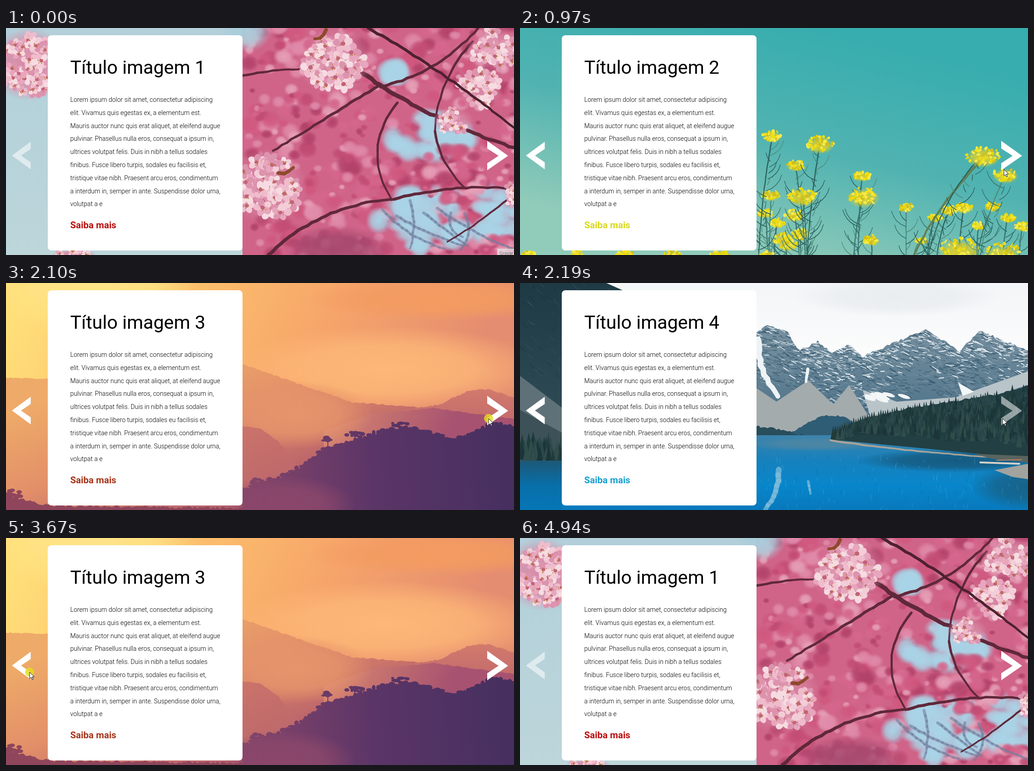
Animation of 1119x501 px, one loop 5.07 s. Source, as an HTML page with a canvas:

```html
<!DOCTYPE html>
<html lang="pt">
<head>
<meta charset="utf-8">
<title>Carrossel</title>
<style>
html, body { margin: 0; width: 100%; height: 100%; overflow: hidden; background: #fff; }
#stage { position: relative; width: 1119px; height: 501px; overflow: hidden; }
section { position: relative; height: 501px; }
canvas, svg { position: absolute; left: 0; top: 0; display: block; }
text { font-family: Roboto, Arial, sans-serif; }
.title { font-size: 41.2px; }
.body { font-size: 14px; font-weight: 300; }
.more { font-size: 20.5px; font-weight: 700; }
#strip, #record, #cursor, #hand, #arrow, #ring { animation: slide 5070ms step-end infinite; }
#record { animation-name: record; }
#cursor { animation-name: move; }
#hand { animation-name: hand; }
#arrow { animation-name: arrow; }
#ring { animation-name: ring; }

@keyframes slide {
  0%, 83.03% { transform: translateY(0); }
  19.13%, 73.76% { transform: translateY(-501px); }
  34.91%, 64.49% { transform: translateY(-1002px); }
  43.19% { transform: translateY(-1503px); }
}
@keyframes record { 0% { opacity: 1; } 1.38%, 100% { opacity: 0; } }
@keyframes hand {
  0%, 19.13%, 34.91%, 64.49%, 100% { opacity: 0; }
  14.98%, 26.82%, 57.79% { opacity: 1; }
}
@keyframes arrow {
  0%, 19.13%, 34.91%, 64.49%, 100% { opacity: 1; }
  14.98%, 26.82%, 57.79% { opacity: 0; }
}
@keyframes ring {
  0%, 19.13%, 43.19%, 64.49%, 81.65%, 100% { opacity: 0; }
  17.75%, 41.42%, 63.11%, 72.38% { opacity: .82; }
}
@keyframes move {
  0%, 1.38% { transform: translate(1097px, 530px); animation-timing-function: steps(4, start); }
  6.90%, 12.22% { transform: translate(1031px, 352px); animation-timing-function: steps(4, start); }
  17.75%, 26.82% { transform: translate(1066px, 312px); animation-timing-function: steps(5, start); }
  33.72%, 49.70% { transform: translate(1063px, 299px); animation-timing-function: steps(3, start); }
  53.84%, 56.41% { transform: translate(86px, 249px); animation-timing-function: steps(4, start); }
  61.93%, 86.78% { transform: translate(52px, 296px); animation-timing-function: steps(3, start); }
  90.92%, 94.67% { transform: translate(1068px, 486px); animation-timing-function: steps(3, start); }
  98.81%, 100% { transform: translate(1075px, 502px); }
}
</style>
</head>
<body>
<div id="stage">
  <div id="strip"></div>
  <svg width="1119" height="501">
    <g id="record">
      <rect x="1082" y="487" width="37" height="14" fill="#e4dde0" opacity=".8"/>
      <text x="1087" y="501" font-size="10.5" fill="#777">Gravar</text>
    </g>
    <g id="cursor">
      <circle id="ring" r="10" fill="#e6dc1e"/>
      <path id="arrow" d="M0 0v14.5l3.4-3.2 2.4 5.4 2.2-1-2.4-5.2h4.6z" fill="#fff" stroke="#111"/>
      <path id="hand" d="M-1 0c0-2 3-2 3 0v5l5.5 1.3q2 .6 2 2.7v3.5q0 2-1.4 3.5v2.5h-7v-2.5l-4.500-5.500q-1.200-2 .6-2.400l1.800 1.600z" fill="#fff" stroke="#111"/>
    </g>
  </svg>
</div>
<script>
const W = 1119, H = 501;
const lines = [
  'Lorem ipsum dolor sit amet, consectetur adipiscing',
  'elit. Vivamus quis egestas ex, a elementum est.',
  'Mauris auctor nunc quis erat aliquet, at eleifend augue',
  'pulvinar. Phasellus nulla eros, consequat a ipsum in,',
  'ultrices volutpat felis. Duis in nibh a tellus sodales',
  'finibus. Fusce libero turpis, sodales eu facilisis et,',
  'tristique vitae nibh. Praesent arcu eros, condimentum',
  'a interdum in, semper in ante. Suspendisse dolor urna,',
  'volutpat a e'
];
let g, seed = 7;

const rnd = () => {
  seed = seed + 0x6D2B79F5 | 0;
  let t = Math.imul(seed ^ seed >>> 15, 1 | seed);
  t = t + Math.imul(t ^ t >>> 7, 61 | t) ^ t;
  return ((t ^ t >>> 14) >>> 0) / 4294967296;
};
const span = (a, b) => a + rnd() * (b - a);
const pick = list => list[rnd() * list.length | 0];
const times = (n, fn) => { for (let i = 0; i < n; i++) fn(i); };

// Calls fn at n random places inside an ellipse
const scatter = (n, x, y, rx, ry, fn) => times(n, () => {
  const a = rnd() * 6.28, d = Math.sqrt(rnd());
  fn(x + Math.cos(a) * d * rx, y + Math.sin(a) * d * ry);
});
function ramp(x0, y0, x1, y1, ...colors) {
  const r = g.createLinearGradient(x0, y0, x1, y1);
  colors.forEach((c, i) => r.addColorStop(i / (colors.length - 1), c));
  return r;
}
function rect(x, y, w, h, fill) {
  g.fillStyle = fill;
  g.fillRect(x, y, w, h);
}
function oval(x, y, rx, ry, fill, turn = 0) {
  g.fillStyle = fill;
  g.beginPath();
  g.ellipse(x, y, rx, ry, turn, 0, 7);
  g.fill();
}
function soft(x, y, rx, ry, color) {
  g.save();
  g.translate(x, y);
  g.scale(rx, ry);
  const r = g.createRadialGradient(0, 0, 0, 0, 0, 1);
  r.addColorStop(0, color);
  r.addColorStop(.55, color + 'cc');
  r.addColorStop(1, color + '00');
  rect(-1, -1, 2, 2, r);
  g.restore();
}
function poly(p, fill) {
  g.beginPath();
  for (let i = 0; i < p.length; i += 2) g.lineTo(p[i], p[i + 1]);
  g.closePath();
  g.fillStyle = fill;
  g.fill();
}
function line(x0, y0, x1, y1, width, color) {
  g.strokeStyle = color;
  g.lineWidth = width;
  g.lineCap = 'round';
  g.beginPath();
  g.moveTo(x0, y0);
  g.lineTo(x1, y1);
  g.stroke();
}
// Tapering, slightly knobbly arc; bend pushes its middle sideways
function bough(x0, y0, x1, y1, width, bend, color) {
  const dx = x1 - x0, dy = y1 - y0, len = Math.hypot(dx, dy), n = Math.ceil(len / 12);
  let px = x0, py = y0;
  times(n, i => {
    const k = (i + 1) / n, off = bend * 4 * k * (1 - k) + (k < 1 ? span(-1, 1) * width * .2 : 0);
    const x = x0 + dx * k - dy / len * off, y = y0 + dy * k + dx / len * off;
    line(px, py, x, y, width * (1.1 - k * .3), color);
    px = x;
    py = y;
  });
}
// Rough outline through a few key points
function ridge(p, rough, step = 5) {
  const out = [];
  for (let i = 0; i < p.length - 2; i += 2) {
    const dx = p[i + 2] - p[i], dy = p[i + 3] - p[i + 1], n = Math.ceil(dx / step);
    times(n, k => out.push(p[i] + dx * k / n, p[i + 1] + dy * k / n + span(-rough, rough)));
  }
  return out.concat(p.slice(-2));
}
function land(p, fill, rough, base = H) {
  const r = ridge(p, rough);
  poly([...r, r[r.length - 2], base, r[0], base], fill);
  return r;
}

function flower(x, y, r) {
  const a0 = rnd() * 6;
  times(5, i => {
    const a = a0 + i * 1.257;
    oval(x + Math.cos(a) * r * .56, y + Math.sin(a) * r * .5, r * .5, r * .38,
      pick(['#e7a6bd', '#efbccd', '#f3cdd8', '#dd93ae', '#f6dce2']), a);
  });
  oval(x, y, r * .24, r * .22, '#c4607f');
  scatter(6, x, y, r * .45, r * .4, (u, v) => oval(u, v, 1.2, 1.2, '#b9793f'));
}
function cluster(x, y, rx, ry, n, r) {
  soft(x, y, rx * 1.1, ry * 1.1, '#d988a5');
  scatter(n, x, y, rx * .85, ry * .85, (u, v) => flower(u, v, span(.7, 1.1) * r));
}
function blossom() {
  const blur = (x, y) => {
    const r = span(7, 26);
    soft(x, y, r, r * span(.7, 1), pick(['#d5658c', '#c24c74', '#e08aa9', '#b3426a', '#d0587f', '#e6a0b7']));
  };
  rect(0, 0, W, H, ramp(0, 0, 0, H, '#b2cfda', '#bcd6da'));
  rect(521, 0, W - 521, H, '#cf6488');
  scatter(900, 820, 250, 420, 350, (x, y) => x > 535 && blur(x, y));
  soft(530, 5, 55, 48, '#a9cddb');
  soft(730, 490, 120, 55, '#a84a70');
  const sky = (x, y) => soft(x, y, span(22, 45), span(16, 34), '#a9d3e6');
  scatter(18, 930, 240, 85, 45, sky);
  scatter(40, 980, 425, 160, 75, sky);
  scatter(6, 856, 105, 12, 16, sky);
  scatter(45, 985, 325, 75, 60, blur);
  scatter(25, 1090, 480, 45, 20, blur);
  times(7, i => bough(830 + i * 30, span(375, 430), span(880, W), span(450, H), 6, span(-15, 15), '#6f7f9f99'));
  const bark = '#60283a';
  bough(521, 105, 655, 92, 5, -4, bark);
  bough(820, 128, 588, 271, 6, 0, bark);
  bough(785, 100, W, 264, 9, 14, bark);
  bough(825, 130, 1040, 0, 6, 20, bark);
  bough(1028, 30, 945, 228, 5, 20, bark);
  bough(945, 228, 1010, 352, 5, 12, bark);
  bough(862, 165, 850, 380, 5, 38, bark);
  bough(578, H, 855, 378, 7, -28, bark);
  bough(855, 378, W, 355, 6, -12, bark);
  bough(1112, 372, 972, 472, 4, -4, bark);
  cluster(722, 72, 75, 72, 42, 20);
  cluster(1080, 45, 60, 45, 22, 18);
  cluster(1045, 132, 45, 42, 18, 17);
  cluster(985, 205, 42, 26, 10, 14);
  bough(798, 0, W, 220, 6, -8, '#4c2130');
  cluster(575, 350, 82, 76, 42, 21);
  cluster(50, 80, 78, 74, 44, 17);
  cluster(150, H, 45, 12, 7, 11);
  cluster(W, 365, 16, 26, 5, 14);
  bough(600, 320, 633, 308, 8, 6, '#8d4a2c');
  bough(705, 4, 680, 24, 8, -6, '#8d4a2c');
}

function umbel(x, y, r) {
  soft(x, y + r * .15, r, r * .6, '#d9cf30');
  scatter(16 + r, x, y, r, r * .55, (u, v) => oval(u, v, span(2, 5), span(1.5, 4),
    pick(['#f1e01c', '#e8d80e', '#f6ea4c', '#cfbe20']), rnd() * 3));
}
function plant(x, y, r, lean = 0) {
  const green = () => pick(['#36736d', '#4f8d7d', '#2b625f']);
  bough(x, y, x + lean, H, 2.5, -lean * .15, green());
  for (let h = y + 18; h < H; h += 13) {
    const k = (h - y) / (H - y), len = span(-38, 38);
    bough(x + lean * k, h + 12, x + lean * k + len, h - Math.abs(len) * .7, 1.7, len * .2, green());
  }
  umbel(x, y, r);
}
function meadow() {
  rect(0, 0, W, H, ramp(620, 0, 500, H, '#38adaf', '#51b3b1', '#91cbb9'));
  times(9, i => plant(850 + i * 32, span(385, 470), span(12, 19), span(-40, 5)));
  times(7, i => plant(540 + i * 13, span(365, 480), span(15, 23), span(-10, 10)));
  plant(556, 238, 21, -30);
  plant(606, 302, 20, 22);
  plant(661, 255, 31, -28);
  plant(622, 370, 32, 10);
  plant(753, 326, 18, -8);
  plant(757, 370, 36, -22);
  plant(775, 468, 18);
  bough(1020, 290, 868, H, 5, 12, '#5f8256');
  plant(1020, 280, 38, -120);
  plant(1070, 323, 28, -55);
  times(6, i => umbel(20 + i * 105, H, span(12, 24)));
  umbel(968, 488, 46);
  umbel(1062, 498, 42);
}

function sunset() {
  rect(0, 0, W, H, ramp(60, 0, 900, 420, '#ffdf79', '#fcc06c', '#f6a46a', '#e58d70'));
  soft(200, 0, 220, 130, '#ffe487');
  soft(840, 190, 350, 95, '#fdb777');
  soft(960, 35, 300, 48, '#f39b60');
  land([0, 209, 92, 211, 300, 150, 521, 179, 760, 263, W, 290],
    ramp(300, 180, 420, H, '#eeaa68', '#e39069', '#b9626b'), 1.5);
  land([780, 296, 955, 268, 1020, 237, 1065, 235, W, 253], ramp(0, 235, 0, 350, '#d27a6c', '#b9626d'), 1.5);
  land([700, 325, 800, 290, 940, 276, W, 300], ramp(700, 280, 950, 390, '#db8a70', '#a75270'), 1);
  soft(640, 290, 170, 75, '#e5946b');
  land([521, 316, 560, 321, 600, 350, 660, 425], ramp(521, 310, 600, 470, '#cb746a', '#bb666c'), 1);
  const dark = ramp(530, 430, 1090, 400, '#85456a', '#5b3567', '#473060');
  const edge = land([521, 456, 625, 422, 700, 369, 830, 327, 885, 321, 990, 347, 1075, 311, W, 319], dark, 3);
  for (let i = 0; i < edge.length; i += 4) oval(edge[i], edge[i + 1], span(4, 10), span(3, 7), dark);
  const tree = (x, y, r) => {
    line(x, y, x, y + 30, 2, dark);
    scatter(14, x, y, r, 6, (u, v) => oval(u, v, span(3, 7), span(2, 4), dark));
  };
  tree(866, 312, 20);
  tree(768, 333, 20);
  tree(709, 346, 11);
  tree(549, 438, 16);
  soft(620, 490, 150, 65, '#8b476b');
  land([0, 468, 92, 491, 521, 497], '#8f465c', 3);
  scatter(14, 18, 466, 20, 9, (x, y) => oval(x, y, 6, 4, '#8f465c'));
}

function forest(edge, depth, n, size) {
  times(n, i => {
    const k = (rnd() * edge.length / 2 | 0) * 2, x = edge[k], h = span(.6, 1.3) * size;
    const y = edge[k + 1] + i / n * depth(x);
    poly([x, y - h * .4, x + h * .2, y + h * .6, x - h * .2, y + h * .6],
      pick(['#1b3539', '#29474a', '#203b3c', '#314d4b']));
  });
}
function rock(p, n, snow) {
  g.save();
  const r = land(p, ramp(0, 100, 0, 270, '#7790a0', '#54778c'), 3, 340);
  g.clip();
  times(n, () => {
    const k = (rnd() * r.length / 2 | 0) * 2, d = Math.pow(rnd(), 1.4) * 125;
    const x = r[k], y = r[k + 1] + d, len = span(4, 14);
    line(x, y, x + len, y + len * span(-.25, .7), span(.7, 2.2),
      rnd() < snow * (1 - d / 110) ? '#e6edf1' : pick(['#426478', '#4f7084', '#7893a1', '#3a5b70']));
  });
  g.restore();
}
function lake() {
  rect(0, 0, W, H, ramp(0, 0, 0, 180, '#f3f5f7', '#fdfdfd'));
  soft(830, 30, 230, 45, '#e9edf0');
  rock([600, 158, 656, 129, 690, 156, 724, 134, 755, 162, 893, 102, 968, 151, 1012, 105, W, 149], 1500, .6);
  poly([755, 236, 830, 262, 960, 252, W, 195, W, 225, 960, 275, 760, 300], '#b9c4c9');
  scatter(9, 810, 252, 50, 7, (x, y) => oval(x, y, 14, 4, '#f3f6f7', .3));
  poly([965, 220, 1000, 240, 975, 249], '#f3f6f7');
  rock([521, 106, 548, 94, 590, 108, 606, 140, 635, 165, 728, 190, 756, 240, 775, 310], 800, .35);
  poly([521, 232, 565, 262, 635, 215, 690, 268, 725, 225, 775, 305, 640, 330, 521, 330], '#a4abad');
  bough(524, 125, 568, 250, 13, 12, '#eef3f6');
  bough(634, 190, 630, 218, 7, 0, '#eef3f6');
  land([585, 336, 665, 292, 715, 294, 760, 325], '#2f5d75', 2, 337);
  land([521, 316, 550, 318, 625, 336], '#284d5b', 3, 337);
  rect(0, 336, W, H - 336, ramp(0, 336, 0, H, '#3d83aa', '#1681bd', '#0886cb', '#0879bc'));
  soft(650, 355, 150, 16, '#4c86a4');
  soft(960, 392, 220, 26, '#155b81');
  soft(W, 450, 130, 50, '#17638a');
  times(150, () => {
    const x = span(525, W), y = span(375, H);
    line(x, y, x + span(-4, 4), y + span(3, 14), 1.2, pick(['#4ba8db66', '#0a649b66', '#83c5e444']));
  });
  bough(570, 412, 540, H, 12, -8, '#87c0dcaa');
  bough(635, 438, 640, 465, 6, 0, '#87c0dcaa');
  const slope = land([690, 328, 760, 298, 850, 277, 1050, 246, W, 226], '#223f43', 2, 347);
  poly([690, 346, W, 346, W, 388, 900, 366], '#223f43');
  forest(slope, x => (x - 680) * .27, 900, 24);
  bough(684, 347, 1040, 384, 4, 4, '#a9a398');
  poly([1045, 413, W, 399, W, 433, 1085, 428], '#a1a39e');
  poly([1000, 377, W, 382, W, 396, 1040, 388], '#59645e');
  line(1014, 396, 1100, 399, 4, '#d8d2c8');
  line(1050, 391, 1105, 390, 2, '#b98468');

  poly([0, 0, 190, 0, 235, 20, 235, 400, 0, 400], ramp(0, 0, 0, 250, '#1e3a45', '#2c4853'));
  times(120, () => {
    const x = span(0, 220), y = span(0, 210), len = span(5, 16);
    line(x, y, x + len, y + len * .9, 1, pick(['#35525d', '#172f39', '#3f5c66']));
  });
  poly([0, 205, 92, 275, 92, 350, 0, 310], '#5f7178');
  poly([0, 280, 92, 330, 92, 395, 0, 395], '#3c5158');
  forest(ridge([0, 340, 92, 352], 2), () => 30, 60, 38);
  rect(0, 392, 92, H - 392, ramp(0, 392, 0, H, '#1d5877', '#086fa9', '#0576b6'));
}

const left = 'M54.5 251 13 281.5l41.5 30.5v-15.5L33 281.5l21.5-14.5z';
const right = 'M1060 249l46 33-46 32v-15.5l25-16.5-25-16z';
const slides = [
  { paint: blossom, color: '#b90d0d', l: .55, r: 1 },
  { paint: meadow, color: '#d9d91c', l: 1, r: 1 },
  { paint: sunset, color: '#a63318', l: 1, r: 1 },
  { paint: lake, color: '#17a0d1', l: 1, r: .52 }
];
const body = lines.map((s, i) =>
  `<text class="body" x="141.5" y="${Math.round(163 + i * 28.8)}">${s}</text>`).join('');

slides.forEach((s, i) => {
  const section = document.createElement('section');
  section.innerHTML = `<canvas width="${W}" height="${H}"></canvas>
    <svg width="${W}" height="${H}">
      <rect x="92" y="16" width="429" height="475" rx="8" fill="#fff"/>
      <text class="title" x="141.5" y="101">Título imagem ${i + 1}</text>${body}
      <text class="more" x="141.5" y="442" fill="${s.color}">Saiba mais</text>
      <path d="${left}" fill="#fff" opacity="${s.l}"/>
      <path d="${right}" fill="#fff" opacity="${s.r}"/>
    </svg>`;
  document.getElementById('strip').append(section);
  g = section.firstChild.getContext('2d');
  s.paint();
});
</script>
</body>
</html>
```
